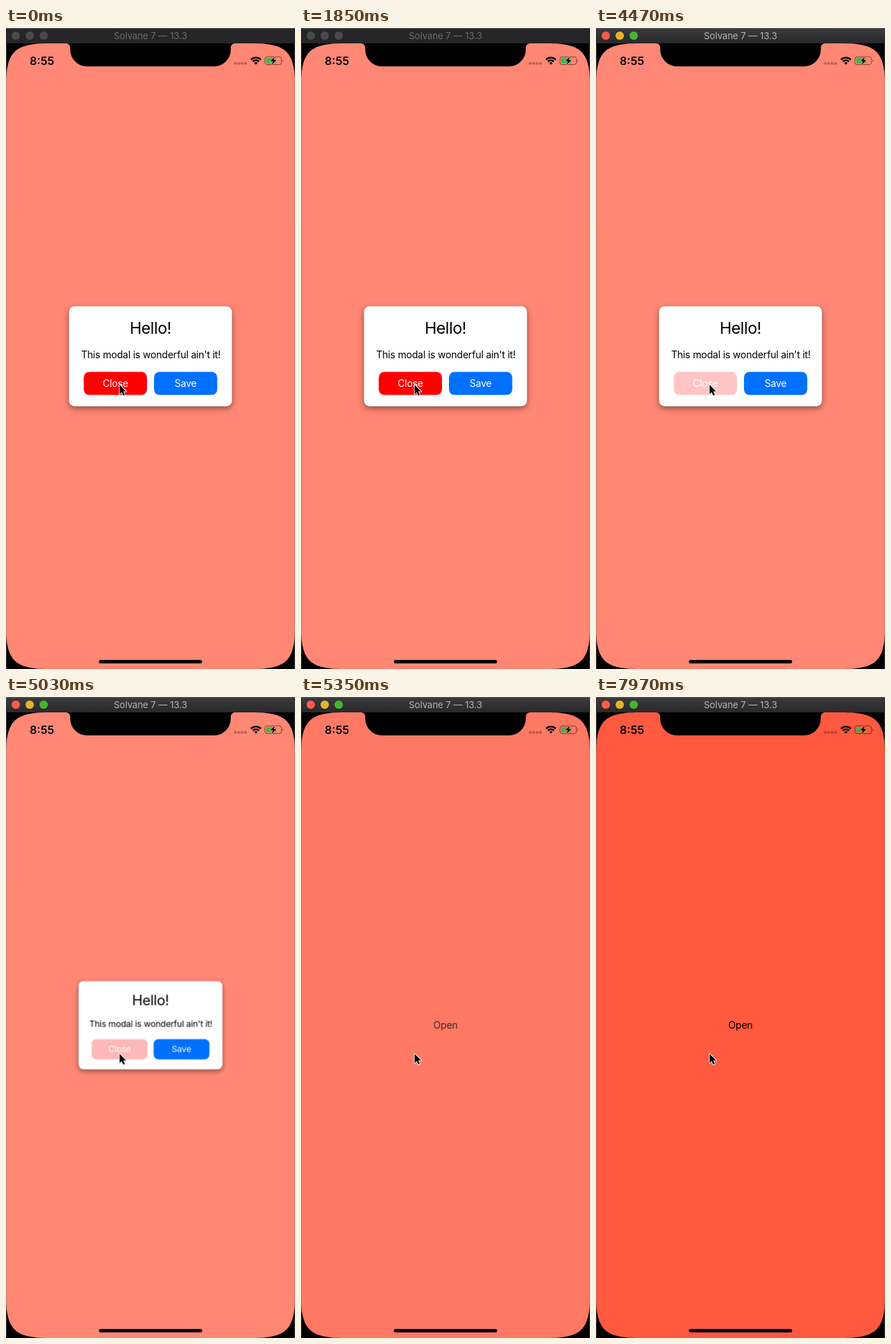
Animation of 414x918 px, one loop 7990 ms. Source, as an HTML page:

```html
<!DOCTYPE html>
<html lang="en">
<head>
<meta charset="utf-8">
<title>Modal demo</title>
<style>
  html, body { margin: 0; width: 100%; height: 100%; overflow: hidden; background: #000; }
  svg { display: block; width: 414px; height: 918px; }
  text { font: 14px Inter, Roboto, sans-serif; letter-spacing: -.2px; text-anchor: middle; }
  #modal { transform-origin: 207px 470px; }
  #card { filter: drop-shadow(0 3px 4px rgba(0, 0, 0, .45)); }
  .heading { font-size: 23px; letter-spacing: -.4px; }
  .clock { font-size: 16px; font-weight: 600; letter-spacing: 0; }
  .window-title { font-size: 13px; letter-spacing: 0; }
  .label { fill: #fff; }
</style>
</head>
<body>
<svg viewBox="0 0 414 918">
  <defs>
    <linearGradient id="bar" x2="0" y2="1">
      <stop stop-color="#3b3b3e"/>
      <stop offset="1" stop-color="#29292b"/>
    </linearGradient>
    <!-- Screen outline with continuous corners -->
    <path id="screen" d="M0 84C0 34 12 22 62 22H352C402 22 414 34 414 84V856C414 906 402 918 352 918H62C12 918 0 906 0 856Z"/>
    <path id="bolt" d="M384.8 41.5L378.8 47.6H382.3L380.8 52.4L387 46.1H383.4Z"/>
    <mask id="around-bolt">
      <rect x="370" y="40" width="26" height="14" fill="#fff"/>
      <use href="#bolt" stroke="#000" stroke-width="1.6"/>
    </mask>
  </defs>

  <!-- Window -->
  <rect width="414" height="918"/>
  <rect width="414" height="22" fill="#262628"/>
  <g fill="#4a4a4c">
    <circle cx="14" cy="11" r="6"/>
    <circle cx="34" cy="11" r="6"/>
    <circle cx="54" cy="11" r="6"/>
  </g>
  <text class="window-title" x="207" y="16" fill="#6b6b6d">Solvane 7 — 13.3</text>
  <g id="active" opacity="0">
    <rect width="414" height="22" fill="url(#bar)"/>
    <circle cx="14" cy="11" r="6" fill="#ff5a4a"/>
    <circle cx="34" cy="11" r="6" fill="#e6b42a"/>
    <circle cx="54" cy="11" r="6" fill="#45b52e"/>
    <text class="window-title" x="207" y="16" fill="#b4b4b6">Solvane 7 — 13.3</text>
  </g>
  <path d="M0 .5H414" stroke="#58585a"/>
  <path d="M.5 22V918M413.5 22V918" stroke="#383838"/>

  <!-- App -->
  <use href="#screen" fill="#ff593f"/>
  <text x="207" y="475">Open</text>
  <use id="backdrop" href="#screen" fill="#fff" opacity=".28"/>
  <path d="M.5 72V868M413.5 72V868" stroke="#777" stroke-opacity=".35"/>

  <g id="modal">
    <rect id="card" x="90.3" y="398.5" width="233.4" height="143.2" rx="8" fill="#fff"/>
    <text class="heading" x="207" y="437.5">Hello!</text>
    <text x="207.5" y="473">This modal is wonderful ain't it!</text>
    <g id="close">
      <rect x="111.4" y="492.5" width="90.6" height="33" rx="8" fill="#f00"/>
      <text class="label" x="156.8" y="514">Close</text>
    </g>
    <rect x="212" y="492.5" width="90.6" height="33" rx="8" fill="#0070ff"/>
    <text class="label" x="257.2" y="514">Save</text>
  </g>

  <!-- Phone hardware and status bar -->
  <path d="M86 22A6 6 0 0 1 92 28V31A24 24 0 0 0 116 55H298A24 24 0 0 0 322 31V28A6 6 0 0 1 328 22Z"/>
  <text class="clock" x="51.5" y="52.5">8:55</text>
  <g fill-opacity=".27">
    <rect x="326.3" y="49" width="4" height="3.6" rx="1"/>
    <rect x="331.2" y="49" width="4" height="3.6" rx="1"/>
    <rect x="336.1" y="49" width="4" height="3.6" rx="1"/>
    <rect x="341" y="49" width="4" height="3.6" rx="1"/>
  </g>
  <path d="M351 45.3A9.8 9.8 0 0 1 365 45.3M353.7 48.1A6 6 0 0 1 362.3 48.1" fill="none" stroke="#000" stroke-width="2.4"/>
  <path d="M358 52.6L355.6 50.2A3.3 3.3 0 0 1 360.4 50.2Z"/>
  <g mask="url(#around-bolt)">
    <rect x="371" y="41.3" width="23.5" height="11.2" rx="3" fill="none" stroke="#000" stroke-opacity=".5"/>
    <rect x="372.8" y="43" width="14.4" height="7.8" rx="1.6" fill="#35b94f"/>
  </g>
  <path d="M396 45Q398 46.9 396 48.8Z" fill-opacity=".55"/>
  <use href="#bolt"/>
  <rect x="133" y="905" width="148" height="5" rx="2.5"/>

  <path d="M162.7 511V524.2L165.7 521.4L168 526.6L170.2 525.6L168 520.5H172.2Z" stroke="#fff" stroke-width="1.8" stroke-linejoin="round" paint-order="stroke"/>
</svg>
<script>
  const LOOP = 7990;

  // Each step: [time in ms, value, optional easing to the next step]
  function track(id, property, steps) {
    const frames = steps.map(([time, value, easing = 'linear']) =>
      ({ offset: time / LOOP, [property]: value, easing }));
    document.getElementById(id).animate(frames, { duration: LOOP, iterations: Infinity });
  }

  track('active', 'opacity', [[0, 0], [4290, 0], [4290, 1], [LOOP, 1]]);

  track('close', 'opacity', [
    [0, 1], [4290, 1, 'ease-in-out'], [4440, .23], [4990, .23],
    [5030, .28, 'ease-in-out'], [5240, 1], [LOOP, 1]
  ]);

  track('modal', 'transform', [
    [0, 'scale(1)'], [5003, 'scale(1)'], [5030, 'scale(.883)'], [5050, 'scale(.883)'],
    [5100, 'scale(.3)', 'ease-out'], [5300, 'scale(0)'], [LOOP, 'scale(0)']
  ]);
  track('modal', 'opacity', [
    [0, 1], [5100, 1, 'ease-out'], [5300, 0], [LOOP, 0]
  ]);

  track('backdrop', 'opacity', [
    [0, .28], [5350, .28], [5350, .19], [5450, .19, 'ease-out'], [5770, 0], [LOOP, 0]
  ]);
</script>
</body>
</html>
```
